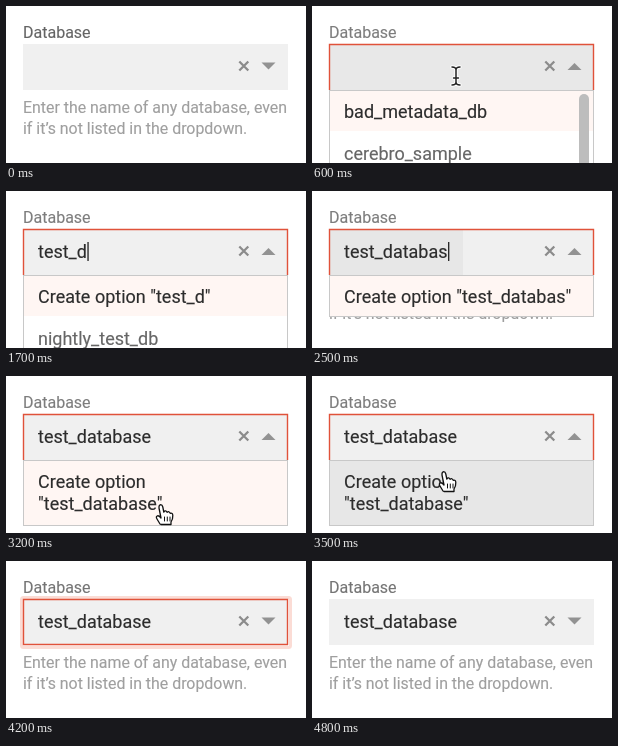
Write an HTML page that moves like this. It is 300 px wide and 157 px high and loops after 5300 ms.

```html
<!DOCTYPE html>
<html lang="en">
<head>
<meta charset="utf-8">
<title>Database picker</title>
<style>
  html, body { margin: 0; width: 100%; height: 100%; overflow: hidden; background: #fff; }
  svg { display: block; width: 100vw; height: 100vh; }
  text { font: 18px Roboto, Arial, sans-serif; fill: #2c2c2c; stroke: #2c2c2c; stroke-width: .15px; white-space: pre; }
  .help { font-size: 15.9px; fill: #9f9f9f; stroke: #9f9f9f; }
  #label { font-size: 16px; }
</style>
</head>
<body>
<svg viewBox="0 0 300 157">
  <text id="label" x="17" y="32">Database</text>
  <text class="help" x="17" y="106.5">Enter the name of any database, even</text>
  <text class="help" x="17" y="128">if it’s not listed in the dropdown.</text>

  <g id="menu">
    <rect id="panel" x="17.5" y="84.5" width="264" fill="#fff" stroke="#c8c8c8"/>
    <rect id="first" x="18" y="85" width="263"/>
    <text id="row1" x="32" y="112"></text>
    <text id="row1b" x="32" y="134"></text>
    <text id="row2" x="32" y="154" style="fill:#666;stroke:#666"></text>
    <rect id="bar" x="267" y="88" width="10" height="90" rx="5" fill="#bdbdbd"/>
  </g>

  <rect id="glow" x="15.5" y="36.5" width="269" height="50" rx="2" fill="none" stroke="#fbdcd5" stroke-width="3"/>
  <rect id="field" x="17" y="38" width="265" height="46"/>
  <rect id="shade" x="18" y="39" width="133" height="45" fill="#e7e7e7"/>
  <path id="edge" fill="none" stroke="#e0523a" stroke-width="1.4"/>
  <text id="value" x="32" y="66.5"></text>
  <rect id="caret" y="51" width="1.3" height="19" fill="#222"/>
  <path d="M233.3 55.5l9 9m0-9l-9 9" stroke="#8c8c8c" stroke-width="2.3"/>
  <path id="arrow" fill="#929292"/>

  <g id="beam" fill="none" stroke-linecap="round">
    <path d="M-4 -9q4 0 4 3v12q0 3 -4 3M4 -9q-4 0 -4 3v12q0 3 4 3M-2.5 2h5" stroke="#fff" stroke-width="3.4"/>
    <path d="M-4 -9q4 0 4 3v12q0 3 -4 3M4 -9q-4 0 -4 3v12q0 3 4 3M-2.5 2h5" stroke="#222" stroke-width="1.5"/>
  </g>
  <g id="hand" stroke="#111" stroke-width="1.3" stroke-linejoin="round" stroke-linecap="round">
    <path fill="#fff" d="M-4 10L-7 5Q-8.500 2.500 -6.500 1.800Q-5 1.500 -3 4L-5 -6Q-5.300 -9 -3.300 -9.300Q-1.700 -9.300 -1.200 -7L-.2 -2Q1.500 -4.300 3.200 -1.700Q5 -3.300 6.200 -.7Q8.700 -1.500 8.800 1.500Q9 5 7 8V10.500H-3Z"/>
    <path fill="none" d="M.5 3v4M3.300 3v4M6 3v4" stroke-width="1"/>
  </g>
</svg>
<script>
const LOOP = 5300;
const $ = id => document.getElementById(id);
const show = (id, on) => { $(id).style.display = on ? "" : "none"; };
const set = (id, attrs) => {
  for (const key in attrs) $(id).setAttribute(key, attrs[key]);
};
const NAME = "test_database";
// Times at which each further character of NAME is in the field.
const KEYS = [800, 1000, 1100, 1200, 1400, 1700, 1800, 2100, 2300, 2400, 2450, 2500, 2600];

function moveCursor(id, t, start, arrive, leave, from, to) {
  const on = t >= start && t < leave;
  show(id, on);
  if (!on) return;
  const p = Math.min(1, (t - start) / (arrive - start));
  const e = 1 - (1 - p) ** 2;
  const [x, y] = from.map((v, i) => v + (to[i] - v) * e);
  set(id, { transform: `translate(${x} ${y})` });
}

function drawMenu(t, typed) {
  const wrap = typed === NAME;
  const long = t < 1800;
  const hover = t >= 3300;
  const height = long ? 90 : wrap ? 65 : 41;
  let second = "";
  if (!typed) second = "cerebro_sample";
  else if (long) second = typed === "t" ? "bad_metadata_db" : "nightly_test_db";

  set("panel", { height });
  set("first", { height: wrap ? 64 : 40, fill: hover ? "#e7e7e7" : "#fff6f3" });
  $("row1").textContent = !typed ? "bad_metadata_db"
    : "Create option" + (wrap ? "" : ` "${typed}"`);
  $("row1b").textContent = wrap ? `"${typed}"` : "";
  $("row2").textContent = second;
  show("bar", !typed);
}

function draw(now) {
  const t = Math.floor(now % LOOP / 100) * 100;
  const open = t >= 500 && t < 3700;
  const focus = t >= 500 && t < 4500;
  const typed = NAME.slice(0, KEYS.filter(k => k <= t).length);

  const tone = t < 300 ? "#646464" : open ? "#7d7d7d" : "#747474";
  $("label").style.fill = $("label").style.stroke = tone;
  set("field", { fill: open && t < 1000 ? "#e8e8e8" : "#f0f0f0" });
  show("shade", t >= 2400 && t < 2700);
  show("edge", focus);
  show("glow", focus && !open);
  set("edge", { d: open ? "M17.500 84V38.500H281.500V84" : "M17.500 38.500H281.500V83.500H17.500Z" });
  set("arrow", { d: open ? "M255.500 64h14l-7 -7z" : "M255.500 56.500h14l-7 7z" });

  $("value").textContent = typed;
  show("caret", typed && t < 2900);
  set("caret", { x: 32.5 + (typed ? $("value").getComputedTextLength() : 0) });

  show("menu", open);
  if (open) drawMenu(t, typed);
  moveCursor("beam", t, 300, 500, 800, [184, 108], [144, 70]);
  moveCursor("hand", t, 3200, 3500, 4200, [158, 138], [135, 105]);
}

function tick(now) {
  draw(now);
  requestAnimationFrame(tick);
}
draw(0);
requestAnimationFrame(tick);
</script>
</body>
</html>
```
